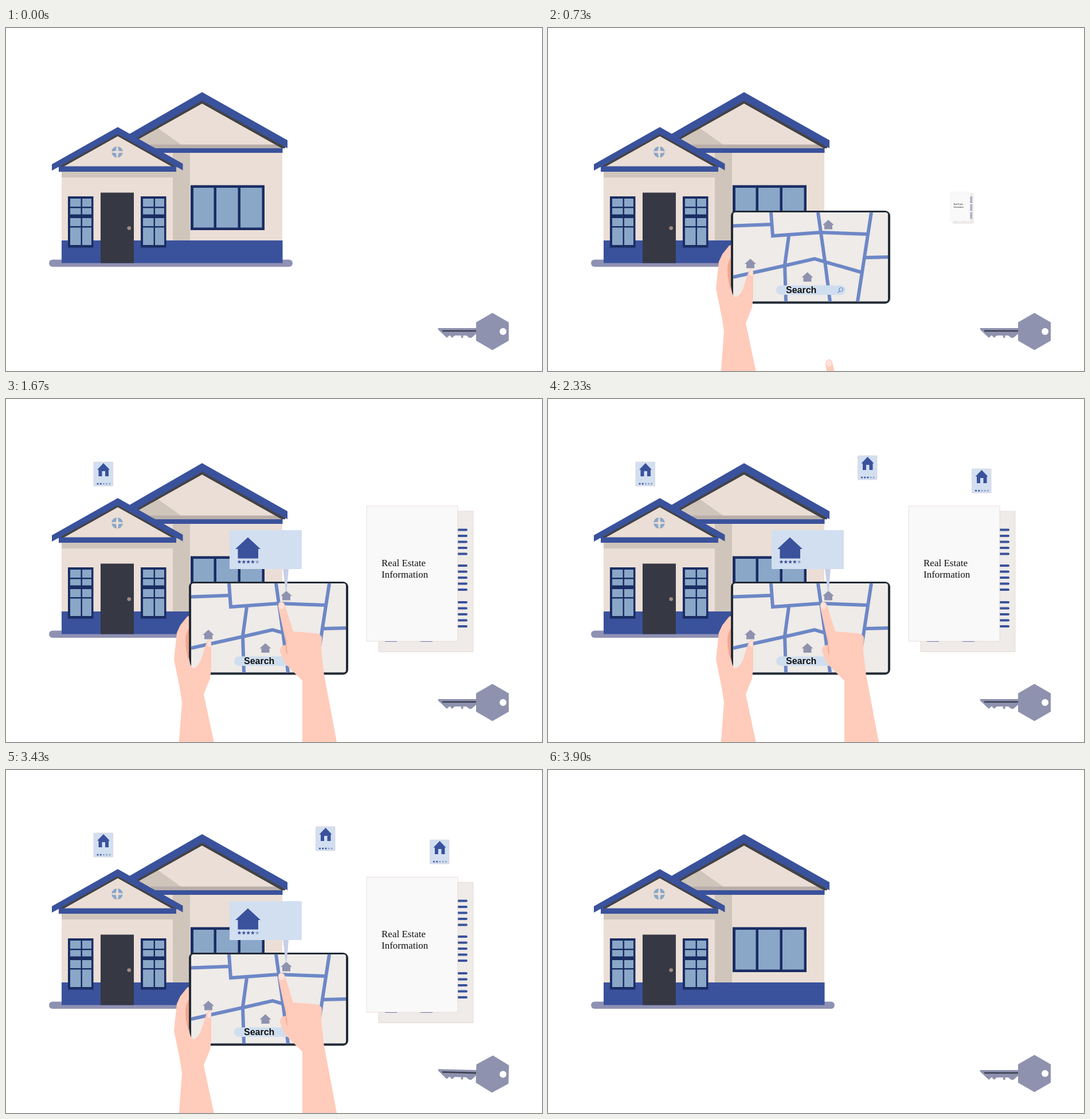
Recreate the animation shown at these times as an HTML page. Size 935 px wide and 599 px high, loop 4.03 s.

```html
<!DOCTYPE html>
<html lang="en">
<head>
<meta charset="utf-8">
<title>House search</title>
<style>
  html, body { margin: 0; width: 100%; height: 100%; overflow: hidden; background: #fff; }
  svg { display: block; width: 100vw; height: 100vh; }
  .blue { fill: #3a529c; }
  .navy { fill: #1a2d63; }
  .glass { fill: #8aa7c8; }
  .wall { fill: #ebded6; }
  .shade { fill: #cfc5bb; }
  .dark { fill: #444345; }
  .grey { fill: #8f92ae; }
  .screen { fill: #eeebe8; }
  .card { fill: #d2dff0; }
  .skin { fill: #ffcbbb; }
  .fold { fill: #f0a88f; }
  .roads { fill: none; stroke: #6d87c6; stroke-width: 6; }
  .lines { fill: none; stroke: #3a529c; stroke-width: 4; stroke-linecap: round; }
</style>
</head>
<body>
<svg id="stage" viewBox="0 0 935 599">
  <g id="house">
    <rect x="75" y="404.5" width="425" height="12.5" rx="6.2" fill="#8f91b3"/>
    <path class="wall" d="M342 128L486 210H482V371H97V250L230 191Z"/>
    <path class="shade" d="M265 175L306 204H250L215 190Z"/>
    <path class="shade" d="M291 218H321V371H291ZM97 250H291V261H97Z"/>
    <path fill="#b9aeaa" d="M250 203.5H477L486 210H260Z"/>
    <path class="blue" d="M255 210H482.5V218H262ZM97 371H482.5V410.5H97Z"/>
    <path class="dark" d="M342 126L487 207V210H481L342 132L228 196L224 191Z"/>
    <path class="blue" d="M342 112L491 196V210L342 127L228 192L212 187Z"/>
    <path class="wall" d="M195 185L297 243H93Z"/>
    <path class="dark" d="M195 184L300 243H291L195 189L99 243H90Z"/>
    <path class="blue" d="M195 173L308.5 237V248.5L195 185.5L80 249V238ZM92 241.5H297V251H92Z"/>
    <circle class="glass" cx="194" cy="216.5" r="9.8"/>
    <path class="wall" d="M193 206H195.2L196 214.5L204 215.4V217.6L196 218.5L195.2 227H193L192 218.5L184 217.6V215.4L192 214.5Z"/>
    <g id="pane">
      <path class="navy" d="M108 294H152.5V383.5H108Z"/>
      <path class="glass" d="M112 298H130.5V312H112ZM133 298H149V312H133ZM112 314.5H130.5V325.5H112ZM133 314.5H149V325.5H133ZM112 332H130.5V346H112ZM133 332H149V346H133ZM112 348.5H130.5V379H112ZM133 348.5H149V379H133Z"/>
    </g>
    <use href="#pane" x="127"/>
    <rect x="165" y="287.5" width="58" height="123" fill="#363844"/>
    <circle cx="214.7" cy="349.5" r="3.3" fill="#a08c82"/>
    <path class="navy" d="M322 274.5H451V353H322Z"/>
    <path class="glass" d="M327 279H362.5V348.5H327ZM367 279H404.5V348.5H367ZM409 279H446.5V348.5H409Z"/>
  </g>

  <g id="key">
    <path class="grey" d="M753.5 524H820V514L848.5 497.5L877 514V546L848.5 562.5L820 546V534L812 541H808L803 537H797.5V541H794V537H783L778 541L774 536.5L769 541L754 527Z"/>
    <path d="M761 529H820" stroke="#3b3f52" stroke-width="2.6"/>
    <circle cx="867" cy="530" r="6" fill="#fff"/>
  </g>

  <g id="papers">
    <rect class="screen" x="650" y="196" width="165" height="245.5" stroke="#e6cfd0" stroke-width=".7"/>
    <path class="lines" id="rows"/>
    <path d="M661 423.5H682M723 423.5H744" stroke="#3a529c" stroke-width="1.2"/>
    <rect x="629" y="187" width="159" height="236" fill="#f9f9f9" stroke="#e6cfd0" stroke-width=".7"/>
    <g font-family="'Liberation Serif', Times, serif" font-size="17" fill="#111">
      <text x="655" y="292">Real Estate</text>
      <text x="655" y="312">Information</text>
    </g>
  </g>

  <g id="tablet">
    <path class="skin" d="M325 377L316 380L304 395L298 408L293 455L303 504L307 530L301 610H365L345 516L340 470Z"/>
    <path class="fold" d="M322 396Q313 408 313 420Q313 445 322 464Z"/>
    <rect x="319" y="319" width="278" height="162.5" rx="9" fill="#222b36"/>
    <rect class="screen" x="323" y="322" width="270" height="155.5" rx="4"/>
    <path class="roads" d="M323 345.5L390 343M389 322L392 363L475 357L557 360M471 322L483 407L492 478M564 322L540 478M552 401L593 400M420 363L413 414L415 478M323 435L413 415L465 403L548 427"/>
    <path class="grey" id="pin" d="M479 344L489 335L499 344H496V351.5H482V344Z"/>
    <use href="#pin" x="-136" y="68"/>
    <use href="#pin" x="-36.5" y="91.5"/>
    <rect x="398" y="449.5" width="121" height="16.5" rx="8.2" fill="#cfdeef"/>
    <text x="415" y="463" font-family="'Liberation Sans', Arial, sans-serif" font-weight="bold" font-size="16" fill="#111">Search</text>
    <path d="M509 459L505.5 462.5" stroke="#6d87c6" stroke-width="1.4"/>
    <circle cx="511" cy="456.7" r="3.2" fill="none" stroke="#6d87c6" stroke-width="1.2"/>
    <path class="skin" d="M319 450Q321 469 327 470Q334 469 340 456L347 434Q350 422 355 420Q359 421 358 432V470L356 488L344 518L318 505Z"/>
    <path d="M351 428Q354 420 357 422L357 433Q353 435 351 428Z" fill="#ffe2da"/>
  </g>

  <g id="label">
    <path d="M483 296H493L489.5 336H488Z" fill="#c6cfe6"/>
    <rect class="card" x="390" y="229" width="126" height="68" rx="1.5"/>
    <path class="blue" d="M400 262L422 241.5L444 262H440V278.5H404.5V262Z"/>
    <g id="stars"></g>
  </g>

  <g id="cards"></g>

  <g id="arm">
    <path class="skin" d="M517 482H555L579 610H517Z"/>
    <g id="hand">
      <path class="skin" d="M475 364Q474 355 480 354Q485 354 487 361L501 406L540 409Q551 411 551 418L550 440L556 492L530 505L516 491L486 461L478 441Q477 434 482 431L489 429Z"/>
      <path class="fold" d="M487 406L491 447Q487 440 488 428Z"/>
      <path d="M476 361Q476 355 480 355Q484 355 485.5 361Q485 367 481 367Q477 367 476 361Z" fill="#ffe2da"/>
    </g>
  </g>
</svg>
<script>
const LOOP = 4030, HIDE = 300;
const $ = id => document.getElementById(id);
const span = (t, from, to) => Math.min(1, Math.max(0, (t - from) / (to - from)));
const easeOut = (p, n = 2) => 1 - (1 - p) ** n;
const outBack = p => 1 + 3.6 * (p - 1) ** 3 + 2.6 * (p - 1) ** 2;

function place(el, transform, shown = true) {
  el.setAttribute('transform', transform);
  el.style.display = shown ? '' : 'none';
}
function zoom(el, s, x, y) {
  place(el, `translate(${x} ${y}) scale(${s}) translate(${-x} ${-y})`, s > 0.005);
}

// Text rows on the back sheet
let rows = '';
for (const top of [228.5, 291, 355])
  for (let i = 0; i < 5; i++) rows += `M770 ${top + i * 10.5}H803`;
$('rows').setAttribute('d', rows);

function star(x, y, r) {
  const points = Array.from({ length: 10 }, (_, i) => {
    const a = i * Math.PI / 5, d = i % 2 ? r * 0.42 : r;
    return `${x + d * Math.sin(a)},${y - d * Math.cos(a)}`;
  });
  return points.join(' ');
}
$('stars').innerHTML = [0, 1, 2, 3, 4].map(i =>
  `<polygon points="${star(407 + i * 7.8, 284.5, 3.8)}" fill="${i < 4 ? '#3a529c' : '#8f9fc6'}"/>`).join('');

// Small rating cards: position, rating, time in, time out
const cards = [
  { x: 153, y: 110, rating: 2, enter: 1450, leave: 3500 },
  { x: 540.5, y: 99, rating: 3, enter: 1850, leave: 3680 },
  { x: 739.5, y: 122, rating: 2, enter: 2110, leave: 3700 }
];
for (const c of cards) {
  const dots = [0, 1, 2, 3, 4].map(i =>
    `<circle cx="${7 + i * 5.2}" cy="38" r="1.6" fill="${i < c.rating ? '#3a529c' : '#8f9fc6'}"/>`).join('');
  $('cards').insertAdjacentHTML('beforeend', `<g><g transform="translate(${c.x} ${c.y})">
    <rect class="card" width="33.5" height="42" rx="1" stroke="#dccdd6" stroke-width=".7"/>
    <path class="blue" d="M6 13.5L17 2L28 13.5H26V25H20V16H14.5V25H8.5V13.5Z"/>${dots}</g></g>`);
  c.el = $('cards').lastElementChild;
}

// Key wobbles: start and duration
const wobbles = [[1197, 450], [1870, 450], [2510, 220], [2997, 450]];

function draw(t) {
  const exit = HIDE * span(t, 3540, 3900) ** 1.74;
  const rise = HIDE * (1 - easeOut(span(t, 140, 670), 2.66));
  const reach = HIDE * (1 - easeOut(span(t, 680, 1200), 2.66));
  place($('tablet'), `translate(0 ${rise + exit})`);
  place($('arm'), `translate(0 ${reach + exit})`);
  place($('hand'), `rotate(${4 * (1 - easeOut(span(t, 1230, 1560)))} 536 495)`);

  const paper = t < 2500 ? outBack(span(t, 700, 1450)) : outBack(1 - span(t, 3555, 3900));
  zoom($('papers'), paper, 722, 314);
  zoom($('label'), easeOut(span(t, 1150, 1370)) * (1 - span(t, 3500, 3640)), 488, 329);

  for (const c of cards) {
    const s = easeOut(span(t, c.enter, c.enter + 210)) * (1 - span(t, c.leave, c.leave + 150) ** 2);
    zoom(c.el, s, c.x + 17, c.y + 21);
  }

  let angle = 0;
  for (const [start, length] of wobbles)
    angle -= 7 * Math.sin(2 * Math.PI * span(t, start, start + length));
  place($('key'), `rotate(${angle} 815.5 530)`);
}

const begin = performance.now();
function tick() {
  draw((performance.now() - begin) % LOOP);
  requestAnimationFrame(tick);
}
tick();
</script>
</body>
</html>
```
